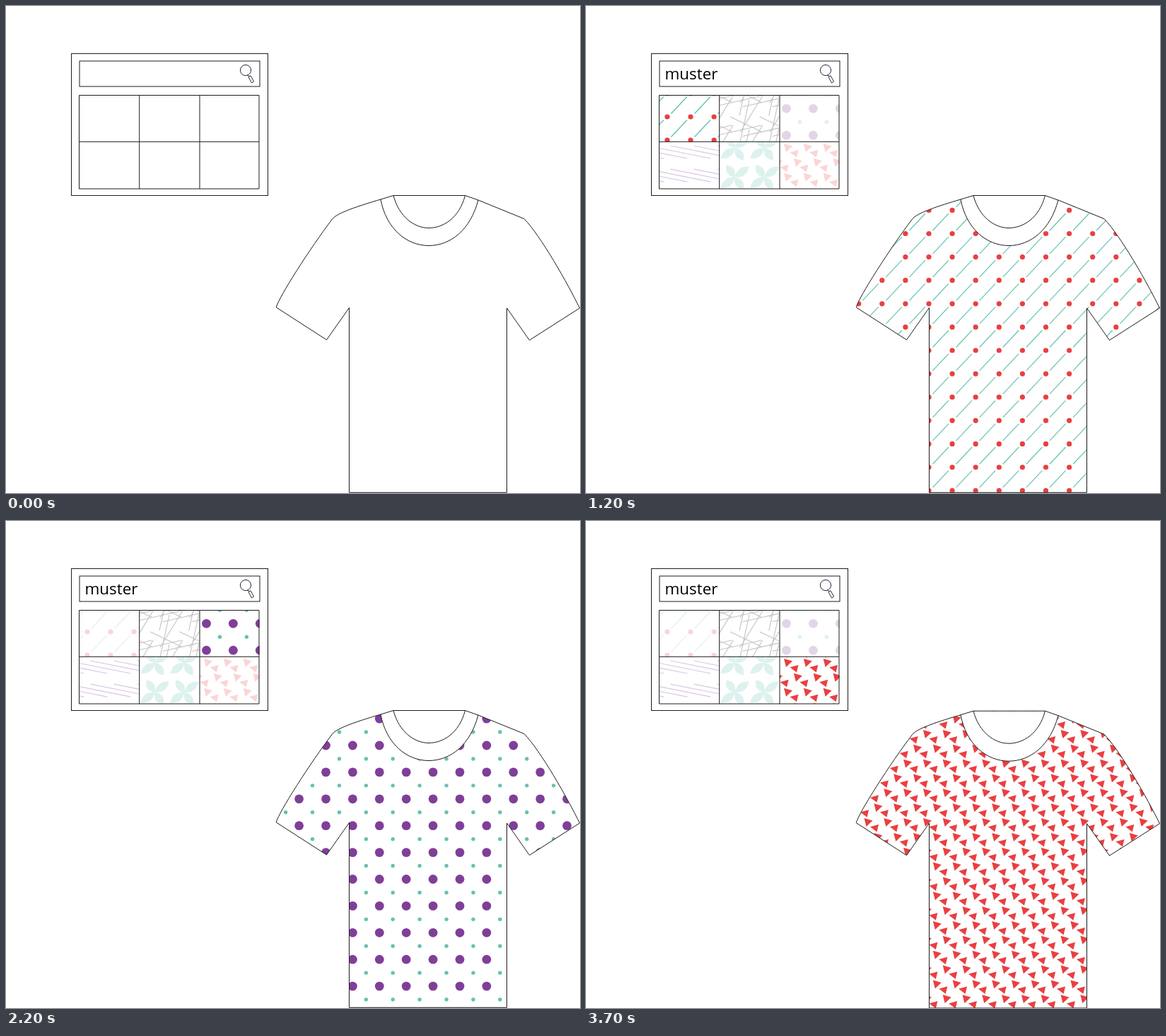
Animation, 812 px wide and 690 px high, one loop 4200 ms. Source, as an HTML page:

```html
<!DOCTYPE html>
<html lang="de">
<head>
<meta charset="utf-8">
<title>Muster</title>
<style>
  html, body { margin: 0; width: 100%; height: 100%; overflow: hidden; background: #fff; }
  svg { display: block; width: 812px; height: 690px; }
  .line { fill: none; stroke: #1c1c1c; stroke-width: 1; }
  text { font: 22.4px "Open Sans", "Noto Sans", sans-serif; fill: #000; }
</style>
</head>
<body>
<svg viewBox="0 0 812 690">
  <defs>
    <path id="body" d="M548 268.5H649.5L668 275L733 301.5C756 325 795 394 811.5 428L740.5 473.5L708.5 428V689.3H485.5V427.5L453.5 473L382.3 427C385 414 431 342 461.5 302C468 293 500 283 530 274Z"/>
    <clipPath id="shirtClip"><use href="#body"/></clipPath>
  </defs>
  <g id="swatches"></g>
  <g class="line">
    <rect x="92.5" y="67.5" width="278" height="201"/>
    <rect x="104" y="78" width="255" height="36"/>
    <path d="M103.5 126.5H358V259H103.5ZM188.7 126V259M274 126V259M103.5 192.3H358"/>
    <g stroke="#2a2540">
      <circle cx="339" cy="91" r="7.6"/>
      <path d="M341.5 97.5L344 100M343 100.5L346 98.7L350.6 107L347.5 109Z"/>
    </g>
  </g>
  <text id="query" x="111.5" y="104.3"></text>
  <g id="shirt">
    <g id="fabrics" clip-path="url(#shirtClip)"></g>
    <path d="M530 274C538 316 567 339.5 598 339.5C629 339.5 657 317 668 275L649.5 268.5H548Z" fill="#fff"/>
    <g class="line">
      <use href="#body"/>
      <path d="M530 274C538 316 567 339.5 598 339.5C629 339.5 657 317 668 275M548 268.5C556 299 578 314.5 598 314.5C618 314.5 641 301 649.5 268.5"/>
    </g>
  </g>
</svg>
<script>
const $ = id => document.getElementById(id);
const red = '#ea3f41', teal = '#66c2b0', purple = '#7f3f98';

const dot = (x, y, r, c) => `<circle cx="${x}" cy="${y}" r="${r}" fill="${c}"/>`;
const fill = (d, c) => `<path d="${d}" fill="${c}" stroke="none"/>`;
const stroke = (d, c) => `<path d="${d}" fill="none" stroke="${c}"/>`;

// Leaf from the centre to a tip, bulging by w on both sides
function leaf(x, y, w = 11) {
  const r = Math.hypot(x, y), ox = -y / r * w, oy = x / r * w;
  return `M0 0Q${x / 2 + ox} ${y / 2 + oy} ${x} ${y}Q${x / 2 - ox} ${y / 2 - oy} 0 0Z`;
}
const triangles = (x, y) =>
  `M${x - 5.5} ${y - 6}l12 3.5l-9 8.5ZM${x + 3} ${y + 6.3}l12 -3.3l-2.5 10.5Z`;

// px, py: repeat; small, large: anchor in the swatch and on the shirt
const patterns = [
  { px: 33.1, py: 33.1, small: [148, 157], large: [485, 322.5], weight: 1.2, faded: .22,
    cell: stroke('M5.5 -4.5L28 -28.5', teal) + dot(0, 0, 3.6, red) },
  { px: 41.7, py: 41.7, small: [204, 157], large: [508, 424], weight: .9, faded: .25,
    cell: stroke('M0 0L44 21M-24 27.5L44 12M13 40L27 -24M14 22L46 -30', '#111') },
  { px: 37.9, py: 37.9, small: [283.5, 145.3], large: [490.4, 318], weight: 1, faded: .22,
    cell: dot(0, 0, 6.4, purple) + dot(18.95, 18.95, 2.7, teal) },
  { px: 33.1, py: 33.15, small: [119.5, 198], large: [490, 430.3], weight: 1.4, faded: .3,
    cell: stroke('M0 0L90 18', purple) },
  { px: 41.7, py: 41.7, small: [210.7, 201], large: [521.5, 384.3], weight: 1, faded: .22,
    cell: fill(leaf(20, -15) + leaf(-12, -17.5) + leaf(-20, 15) + leaf(12, 17.5), teal) },
  { px: 27.8, py: 41.7, small: [285.5, 201], large: [496.3, 447.2], weight: 1, faded: .22,
    cell: fill(triangles(0, 0) + triangles(13.9, 20.85), red) }
];

// Repeats a cell over a box, with a margin for parts that reach in from outside
function tile(i, [ax, ay], x0, y0, x1, y1) {
  const { px, py } = patterns[i];
  let out = '';
  for (let r = Math.floor((y0 - 40 - ay) / py); ay + r * py < y1 + 40; r++)
    for (let c = Math.floor((x0 - 95 - ax) / px); ax + c * px < x1 + 40; c++)
      out += `<use href="#cell${i}" x="${ax + c * px}" y="${ay + r * py}"/>`;
  return out;
}

let defs = '', small = '', large = '';
patterns.forEach((p, i) => {
  const x = 104 + i % 3 * 85, y = 126.5 + (i > 2) * 66;
  defs += `<g id="cell${i}">${p.cell}</g>
    <clipPath id="clip${i}"><rect x="${x}" y="${y}" width="84.5" height="66"/></clipPath>`;
  small += `<g clip-path="url(#clip${i})">${tile(i, p.small, x, y, x + 85, y + 66)}</g>`;
  large += `<g stroke-width="${p.weight}">${tile(i, p.large, 382, 268, 812, 690)}</g>`;
});
document.querySelector('defs').insertAdjacentHTML('beforeend', defs);
$('swatches').innerHTML = small;
$('fabrics').innerHTML = large;
const swatches = [...$('swatches').children], fabrics = [...$('fabrics').children];

function draw(now) {
  const t = now % 4200;
  const chosen = Math.floor((t - 1200) / 500);
  $('query').textContent = 'muster'.slice(0, Math.floor(t / 100));
  $('swatches').style.display = t < 700 ? 'none' : '';
  $('shirt').setAttribute('transform', `translate(0 ${chosen > 2 ? .7 : 0})`);
  patterns.forEach((p, i) => {
    swatches[i].style.opacity = chosen < 0 || chosen === i ? 1 : p.faded;
    swatches[i].style.strokeWidth = chosen === i ? 1.4 : 1.1;
    fabrics[i].style.display = chosen === i ? '' : 'none';
  });
  requestAnimationFrame(draw);
}
draw(performance.now());
</script>
</body>
</html>
```
